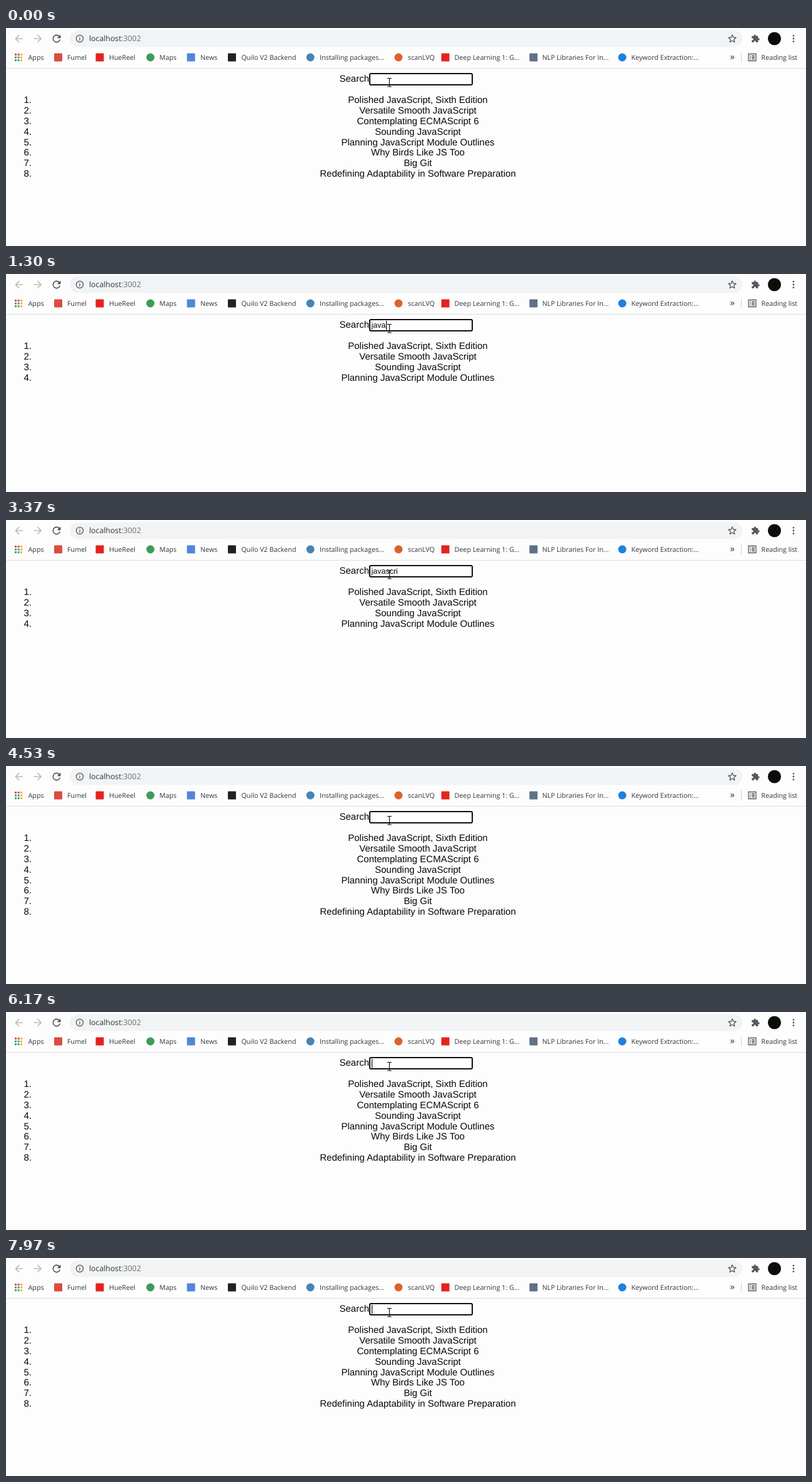
These frames come from a looping animation (1280 by 349 pixels, 8 s). An HTML page:

```html
<!DOCTYPE html>
<html lang="en">
<head>
<meta charset="utf-8">
<title>Book search</title>
<style>
  html, body { margin: 0; width: 100%; height: 100%; overflow: hidden; background: #fdfdfd; }
  svg { display: block; }
  text { white-space: pre; text-rendering: geometricPrecision; }
  .ui { font: 10.75px "Open Sans", "Noto Sans", sans-serif; fill: #303438; }
  .page { font: 15px "Liberation Sans", Arial, sans-serif; fill: #080808; }
</style>
</head>
<body>
<svg id="stage" width="1280" height="349" viewBox="0 0 1280 349">
  <!-- toolbar -->
  <rect x="102" y="3.5" width="1076" height="27" rx="13.5" fill="#f1f3f4"/>
  <g fill="#bdbdb6">
    <path id="arrow" transform="translate(11 7.4) scale(.8)" d="M20 11H7.8l5.6-5.6L12 4l-8 8 8 8 1.4-1.4L7.8 13H20z"/>
    <use href="#arrow" transform="matrix(-1 0 0 1 71.5 0)"/>
  </g>
  <path fill="#4a4d51" transform="translate(71.4 7.4) scale(.8)" d="M17.65 6.35A8 8 0 1 0 19.73 14h-2.08A6 6 0 1 1 12 6c1.66 0 3.14.69 4.22 1.78L13 11h7V4z"/>
  <g fill="none" stroke="#55585c" stroke-width="1.3">
    <circle cx="118" cy="17" r="5.6"/>
    <path d="M118 16v4.2M118 13.4v1.4"/>
    <path stroke-linejoin="round" d="M1162 11l1.8 4 4.3.4-3.3 2.9 1 4.3-3.8-2.3-3.8 2.3 1-4.3-3.3-2.9 4.3-.4z"/>
    <path d="M1188 41.5h12v11h-12zM1190 44.5h1.5M1193 44.5h5M1190 47h1.5M1193 47h5M1190 49.5h1.5M1193 49.5h5"/>
  </g>
  <path fill="#55585c" transform="translate(1192 9.8) scale(.6)" d="M20.5 11H19V7c0-1.1-.9-2-2-2h-4V3.5a2.5 2.5 0 0 0-5 0V5H4c-1.1 0-2 .9-2 2v3.8h1.5a2.7 2.7 0 0 1 0 5.4H2V20c0 1.1.9 2 2 2h3.8v-1.5a2.7 2.7 0 0 1 5.4 0V22H17c1.1 0 2-.9 2-2v-4h1.5a2.5 2.5 0 0 0 0-5z"/>
  <circle cx="1229.5" cy="17" r="10.5" fill="#080b08"/>
  <circle cx="1229.5" cy="17" r="5.5" fill="none" stroke="#3a5a34" stroke-dasharray="1 4"/>
  <path stroke="#55585c" stroke-width="2.8" stroke-linecap="round" d="M1260 12.3h.01M1260 17h.01M1260 21.7h.01"/>
  <text class="ui" x="133" y="21.3" style="font-size:12.3px">localhost<tspan fill="#6b6f73">:3002</tspan></text>
  <g id="bookmarks" class="ui">
    <text x="1158.5" y="51" style="font-size:15px">»</text>
    <text x="1208.5" y="51">Reading list</text>
  </g>
  <path stroke="#d0d2d4" d="M1176.5 39v16"/>
  <path stroke="#dcdddf" d="M0 64.5h1280"/>

  <!-- page -->
  <g class="page">
    <text x="533.5" y="86">Search</text>
    <rect x="582" y="73" width="164" height="18" rx="2" fill="#fff" stroke="#101010" stroke-width="2"/>
    <text id="query" x="584.5" y="86.3" style="font-size:12.5px"></text>
    <rect id="caret" x="585" y="75" width="1.2" height="14.5"/>
    <g id="list"></g>
  </g>
  <path fill="none" stroke="#111" stroke-width="1.2" d="M610 80.5h2.5l1 1 1-1h2.5M613.5 81v12.5M610 94h2.5l1-1 1 1h2.5"/>
</svg>
<script>
const LOOP = 8000, BLINK = 530;
const WORD = "javascri";
const KEY_TIMES = [500, 930, 1070, 1300, 2200, 2370, 2540, 2650];
const ERASE_START = 4130, ERASE_STEP = 30;
const CARET_START = -960;
const FIRST_LINE = 120, LINE_HEIGHT = 16.875;

const BOOKS = [
  "Polished JavaScript, Sixth Edition",
  "Versatile Smooth JavaScript",
  "Contemplating ECMAScript 6",
  "Sounding JavaScript",
  "Planning JavaScript Module Outlines",
  "Why Birds Like JS Too",
  "Big Git",
  "Redefining Adaptability in Software Preparation",
];

// label, text x, icon centre x, icon colour, round icon
const BOOKMARKS = [
  ["Fumel", 98, 83.5, "#dd4b3e"],
  ["HueReel", 165, 150, "#e6221e"],
  ["Maps", 245.5, 231, "#3d9c57", true],
  ["News", 311, 296, "#4f86dc"],
  ["Quilo V2 Backend", 376.5, 361.5, "#222"],
  ["Installing packages...", 502, 487, "#4584b6", true],
  ["scanLVQ", 643, 628, "#d9632b", true],
  ["Deep Learning 1: G...", 717.5, 703, "#e6221e"],
  ["NLP Libraries For In...", 858, 844, "#5f7188"],
  ["Keyword Extraction:...", 1000.5, 986, "#1f7fe0", true],
];

const $ = id => document.getElementById(id);

function add(parent, tag, attrs, text = "") {
  const el = document.createElementNS("http://www.w3.org/2000/svg", tag);
  for (const name in attrs) el.setAttribute(name, attrs[name]);
  el.textContent = text;
  return parent.appendChild(el);
}

function drawBookmarks() {
  const bar = $("bookmarks");
  const red = "#e0483c", yellow = "#f2b71c", green = "#3ba558", blue = "#4285e8";
  [red, red, yellow, green, blue, yellow, green, green, yellow].forEach((fill, i) =>
    add(bar, "rect", { x: 14 + i % 3 * 4.6, y: 41 + Math.floor(i / 3) * 4.6, width: 3, height: 3, fill }));
  add(bar, "text", { x: 35.5, y: 51 }, "Apps");
  for (const [label, x, cx, fill, round] of BOOKMARKS) {
    if (round) add(bar, "circle", { cx, cy: 47, r: 6.5, fill });
    else add(bar, "rect", { x: cx - 6.5, y: 40.5, width: 13, height: 13, rx: 1, fill });
    add(bar, "text", { x, y: 51 }, label);
  }
}

function queryAt(t) {
  const typed = KEY_TIMES.filter(k => k <= t).length;
  const erased = t < ERASE_START ? 0 : Math.floor((t - ERASE_START) / ERASE_STEP) + 1;
  return WORD.slice(0, Math.max(0, typed - erased));
}

function showResults(query) {
  const list = $("list");
  list.textContent = "";
  BOOKS.filter(b => b.toLowerCase().includes(query)).forEach((book, i) => {
    const y = FIRST_LINE + LINE_HEIGHT * i;
    add(list, "text", { x: 41, y, "text-anchor": "end" }, `${i + 1}.`);
    add(list, "text", { x: 659, y, "text-anchor": "middle" }, book);
  });
}

let shown = null;
function draw(now) {
  const t = now % LOOP;
  const query = queryAt(t);
  if (query !== shown) {
    shown = query;
    $("query").textContent = query;
    showResults(query);
    const width = query ? $("query").getComputedTextLength() : 0;
    $("caret").setAttribute("x", Math.round(585 + width));
  }
  // Each typed key restarts the caret's blink.
  const lastKey = KEY_TIMES.filter(k => k <= t).pop() ?? CARET_START;
  const caretOn = Math.floor((t - lastKey) / BLINK) % 2 === 0;
  $("caret").setAttribute("visibility", caretOn ? "visible" : "hidden");
  requestAnimationFrame(frame);
}

drawBookmarks();
const start = performance.now();
const frame = () => draw(performance.now() - start);
frame();
</script>
</body>
</html>
```
